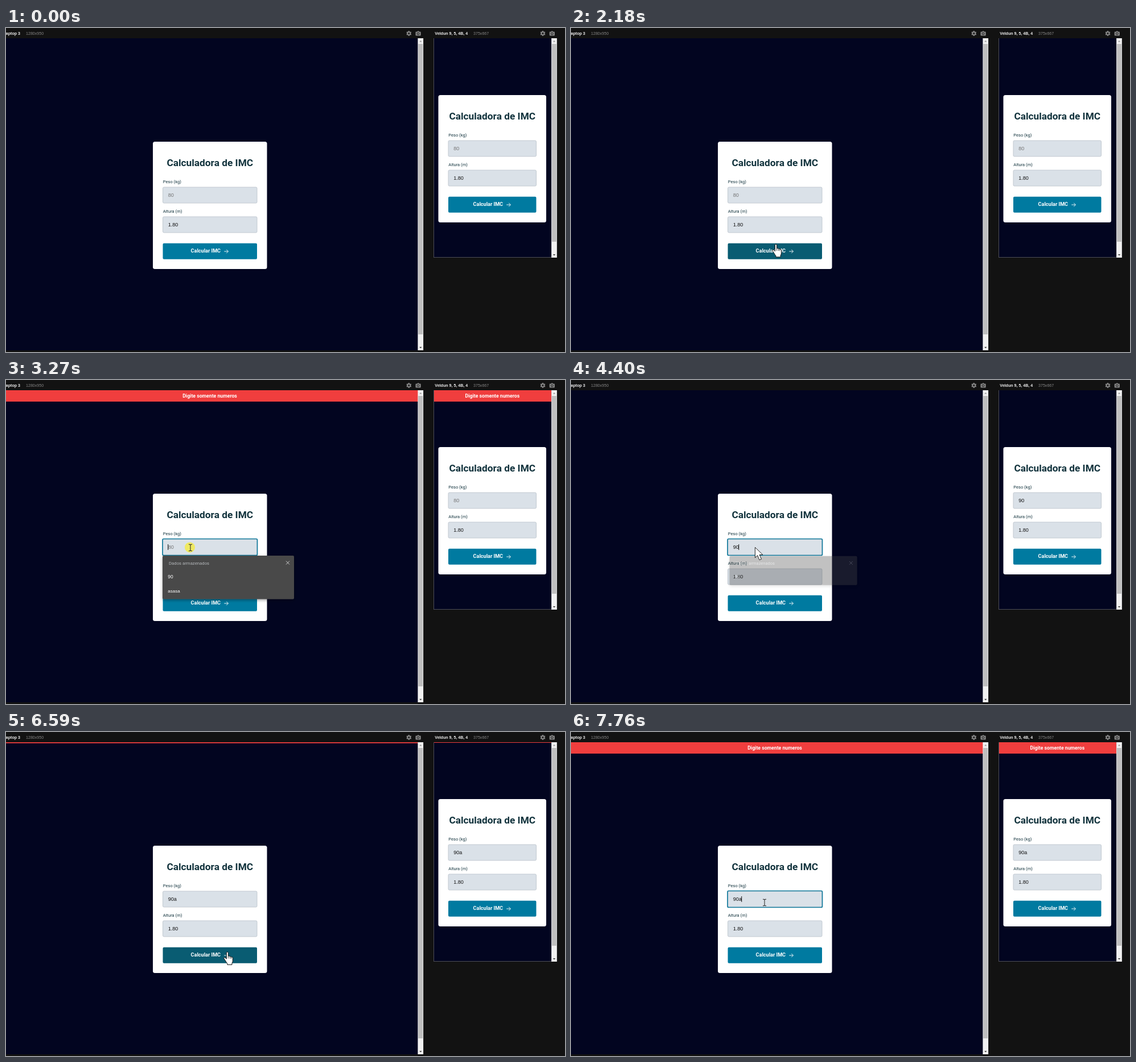
An HTML page for the animation above (8000 ms loop, 982x570 px).

```html
<!DOCTYPE html>
<html lang="pt">
<head>
<meta charset="utf-8">
<title>Calculadora de IMC</title>
<style>
  html, body { margin: 0; width: 100%; height: 100%; overflow: hidden; background: #121212; }
  svg { display: block; width: 100%; height: 100%; font-family: Roboto, sans-serif; }
  .title { font: 700 17.3px Roboto, sans-serif; fill: #12333d; text-anchor: middle; }
  .label { font-size: 7.55px; fill: #12333d; }
  .value { font: 9.1px "Liberation Sans", sans-serif; fill: #111; }
  .value.hint { fill: #757575; }
  .action { font: 700 9.1px Roboto, sans-serif; fill: #fff; }
  .alert { font: 700 8.7px Roboto, sans-serif; fill: #fff; text-anchor: middle; }
  .device { font: 7.1px "Liberation Sans", sans-serif; fill: #858585; }
  .device.name { font-weight: 700; fill: #eee; }
  .field { fill: #dae1e8; stroke: #b9c1c9; stroke-width: .8; }
  .button { fill: #007aa0; }
  .button.hover { fill: #095c72; }
</style>
</head>
<body>
<svg id="stage" viewBox="0 0 982 570" preserveAspectRatio="none"></svg>
<script>
const DURATION = 8000;
const PERIOD = 68.85;

// Pointer hot spot: time, x, y
const PATH = [
  [600, 928, 556], [880, 650, 465], [1110, 408, 372], [1250, 299, 309], [1360, 330, 300],
  [1490, 330, 302], [2250, 363, 388], [2670, 363, 388], [3140, 324, 295],
  [5210, 323, 294], [5480, 395, 345], [5700, 483, 385], [5860, 428, 405],
  [6040, 394, 392], [6180, 389, 387], [6660, 389, 387], [7210, 355, 384],
  [7400, 354, 332], [7560, 340, 300]
];
const CLICKS = [[2390, 2460], [3270, 3340], [6450, 6520], [7620, 7690]];

const rect = (x, y, w, h, attrs = '') =>
  `<rect x="${x}" y="${y}" width="${w}" height="${h}" ${attrs}/>`;
const text = (x, y, cls, content, attrs = '') =>
  `<text x="${x}" y="${y}" class="${cls}" ${attrs}>${content}</text>`;

function card(id, x, y, w) {
  const left = x + 17.5, inner = w - 35, mid = x + w / 2;
  return rect(x, y, w, 224, 'rx="3.5" fill="#fff"') +
    text(mid, y + 43, 'title', 'Calculadora de IMC') +
    text(left + .3, y + 73, 'label', 'Peso (kg)') +
    rect(left, y + 80, inner, 28, 'rx="2" class="field"') +
    text(left + 9.2, y + 97.2, 'value hint', '80', `id="${id}Weight"`) +
    text(left + .3, y + 125, 'label', 'Altura (m)') +
    rect(left, y + 132, inner, 28, 'rx="2" class="field"') +
    text(left + 9.2, y + 149.2, 'value', '1.80') +
    rect(left, y + 178.7, inner, 28, `rx="2" class="button" id="${id}Button"`) +
    text(mid - 33.7, y + 195.4, 'action', 'Calcular IMC') +
    `<path d="M${mid + 25} ${y + 193}h7m-3-3.2 3.2 3.2-3.2 3.2" fill="none" stroke="#fff" stroke-width=".9"/>`;
}

const banner = (id, x, w, mid) =>
  `<g id="${id}Banner">${rect(x, 18, w, 20, 'fill="#f03e3e"')}${text(mid, 31, 'alert', 'Digite somente numeros')}</g>`;

const scrollbar = (x, bottom, thumbEnd) =>
  rect(x, 18, 9.7, bottom - 18, 'fill="#f1f1f1"') +
  rect(x + .8, 28, 8, thumbEnd - 28, 'fill="#bfbfbf"') +
  `<path d="M${x + 2.7} 24.6l2.2-2.6 2.2 2.6z" fill="#999"/>
   <path d="M${x + 2.7} ${bottom - 6}l2.2 2.6 2.2-2.6z" fill="#444"/>`;

function tools(x) {
  let teeth = '';
  for (let a = 0; a < 360; a += 60)
    teeth += rect(-1.2, -4.5, 2.4, 2.6, `rx=".4" fill="#858585" transform="rotate(${a})"`);
  return `<g transform="translate(${x} 9.5)">${teeth}
    <circle r="2.4" fill="none" stroke="#858585" stroke-width="1.8"/></g>
    <g transform="translate(${x + 16.3} 9.5)">
    <path d="M-3.6-3h2l.9-1.2h1.4l.9 1.2h2q1 0 1 1v5q0 1-1 1h-7.2q-1 0-1-1v-5q0-1 1-1z" fill="#858585"/>
    <circle cy=".4" r="1.9" fill="#858585" stroke="#151515" stroke-width=".9"/></g>`;
}

const popup = `<g id="popup">
  <rect id="popupBox" x="275" y="309" width="231" height="76.5" rx="2" fill="#4a4a4a" filter="url(#shadow)"/>
  ${text(286, 324.5, '', 'Dados armazenados', 'font-size="7.75" fill="#b4b7ba"')}
  <path d="M492 318.5l6 6m0-6-6 6" stroke="#ddd" stroke-width=".9"/>
  ${text(284.3, 349.3, 'value', '90', 'style="fill:#fff;font-size:8.4px"')}
  ${text(284.3, 374, 'value', 'asasa', 'id="second" style="fill:#fff;font-size:8px"')}
</g>`;

const pointers = `<g id="pointer">
  <circle id="click" cx="-1" cy="-.5" r="9" fill="#f5ea3c" opacity=".78"/>
  <path id="arrow" d="M0 0v18.2l4.3-4 3.3 8 3.4-1.5-3.3-7.6h5.8z" fill="#fff" stroke="#111" stroke-width=".9"/>
  <path id="beam" d="M-3-5.7h2q1 0 1 1 0-1 1-1h2M0-5v10M-3 5.7h2q1 0 1-1 0 1 1 1h2" fill="none" stroke="#222" stroke-width="1"/>
  <g id="hand"><path d="M-1.7 1.3q0-1.3 1.5-1.3t1.6 1.4v6l1-.3q1.5-.2 1.9 1 1.5-.6 2.3.7 2.6-.5 2.7 1.8v5.2q0 2-1.3 3.8v2.8h-8.2v-2.2q-1.9-2-3-4.3l-2.8-4.2q-.7-1.4.6-2 1.5-.5 3.7 2.5z"
    fill="#fff" stroke="#111" stroke-width="1"/>
  <path d="M1.4 7.4v4M4.3 8.2v3.4M6.6 9.2v2.6" stroke="#111" stroke-width=".8"/></g>
</g>`;

const stage = document.getElementById('stage');
stage.innerHTML =
  `<defs><filter id="shadow" x="-10%" y="-20%" width="120%" height="150%">
    <feDropShadow dx="0" dy="2" stdDeviation="2.5" flood-opacity=".35"/></filter></defs>` +
  rect(0, 0, 982, 570, 'fill="#121212"') +
  rect(0, 18, 724, 549, 'fill="#020520"') +
  rect(751.5, 17.5, 216, 386, 'fill="#020520" stroke="#5c5c66" stroke-width=".8"') +
  banner('wide', 0, 724, 358) + banner('small', 752, 206, 854.4) +
  rect(0, 0, 982, 18, 'fill="#121212"') +
  text(-4.6, 11.8, 'device name', 'Laptop 3') + text(35, 11.8, 'device', '1280x950') +
  text(753.3, 11.8, 'device name', 'Veldun 9, 5, 4B, 4') + text(821, 11.8, 'device', '375x667') +
  tools(707.8) + tools(943) +
  scrollbar(723.4, 567, 539) + scrollbar(958.1, 404, 376) +
  card('wide', 258, 200, 200.5) + card('small', 759.5, 118, 189.5) +
  rect(275, 279.5, 166.5, 29, 'id="focus" rx="2" fill="none" stroke="#127a9c" stroke-width="1.7"') +
  rect(284.2, 289, 1, 10, 'id="caret" fill="#111"') +
  popup + pointers;

const $ = id => document.getElementById(id);
const show = (id, on) => $(id).style.display = on ? '' : 'none';
const between = (t, a, b) => t >= a && t < b;
const clamp = v => Math.min(1, Math.max(0, v));
const smooth = v => v * v * (3 - 2 * v);

function pointerAt(t) {
  const next = PATH.findIndex(p => p[0] > t);
  if (next < 0) return PATH.at(-1).slice(1);
  if (next === 0) return PATH[0].slice(1);
  const [t0, x0, y0] = PATH[next - 1], [t1, x1, y1] = PATH[next];
  const k = (t - t0) / (t1 - t0);
  return [x0 + (x1 - x0) * k, y0 + (y1 - y0) * k];
}

function setBanner(id, t, delay) {
  const start = (t < 4000 ? 2393 : 6535) + delay;
  const slide = smooth(clamp((t - start) / 300));
  show(id, slide > 0);
  $(id).setAttribute('transform', `translate(0 ${(slide - 1) * 20})`);
}

function setWeight(id, typed) {
  $(id).textContent = typed || '80';
  $(id).classList.toggle('hint', !typed);
}

function render(t) {
  const captured = t < 600 ? t : 600 + Math.floor((t - 590) / PERIOD) * PERIOD;
  const bannerTime = between(t, 4000, 6450) ? 4000 : captured;
  setBanner('wideBanner', bannerTime, 0);
  setBanner('smallBanner', bannerTime, 15);

  const typed = t < 4000 ? '' : t < 4270 ? '9' : t < 5080 ? '90' : '90a';
  setWeight('wideWeight', typed);
  setWeight('smallWeight', typed);

  show('focus', between(t, 3270, 6450) || t >= 7620);
  const caretStart = [7620, 5080, 4270, 4000, 3270].find(s => t >= s);
  const caretOn = caretStart && !between(t, 6450, 7620) && Math.floor((t - caretStart) / 530) % 2 === 0;
  show('caret', caretOn);
  $('caret').setAttribute('x', 284.2 + typed.length * 5);

  const closing = clamp(Math.floor((t - 4265) / 65) / 3);
  show('popup', t >= 3270 && closing < 1);
  show('second', t < 4000);
  $('popupBox').setAttribute('height', t < 4000 ? 76.5 : 52.5);
  const scale = 1 - .045 * closing;
  $('popup').setAttribute('opacity', 1 - closing);
  $('popup').setAttribute('transform', `translate(390.5 335) scale(${scale}) translate(-390.5 -335)`);

  const [x, y] = pointerAt(captured);
  const inside = (top, bottom) => t >= 600 && x > 275 && x < 441 && y >= top && y <= bottom;
  const onButton = inside(378.5, 407);
  const onField = inside(280, 308) || inside(332, 360);
  const forcedArrow = between(t, 2530, 2740) || between(t, 4270, 5270);
  const shape = forcedArrow ? 'arrow' : onButton ? 'hand' : onField ? 'beam' : 'arrow';
  show('pointer', t >= 600);
  for (const name of ['arrow', 'hand', 'beam']) show(name, name === shape);
  show('click', CLICKS.some(([a, b]) => between(t, a, b)));
  $('pointer').setAttribute('transform', `translate(${x} ${y})`);
  $('wideButton').classList.toggle('hover', onButton);
}

function tick() {
  render(performance.now() % DURATION);
  requestAnimationFrame(tick);
}
tick();
</script>
</body>
</html>
```
